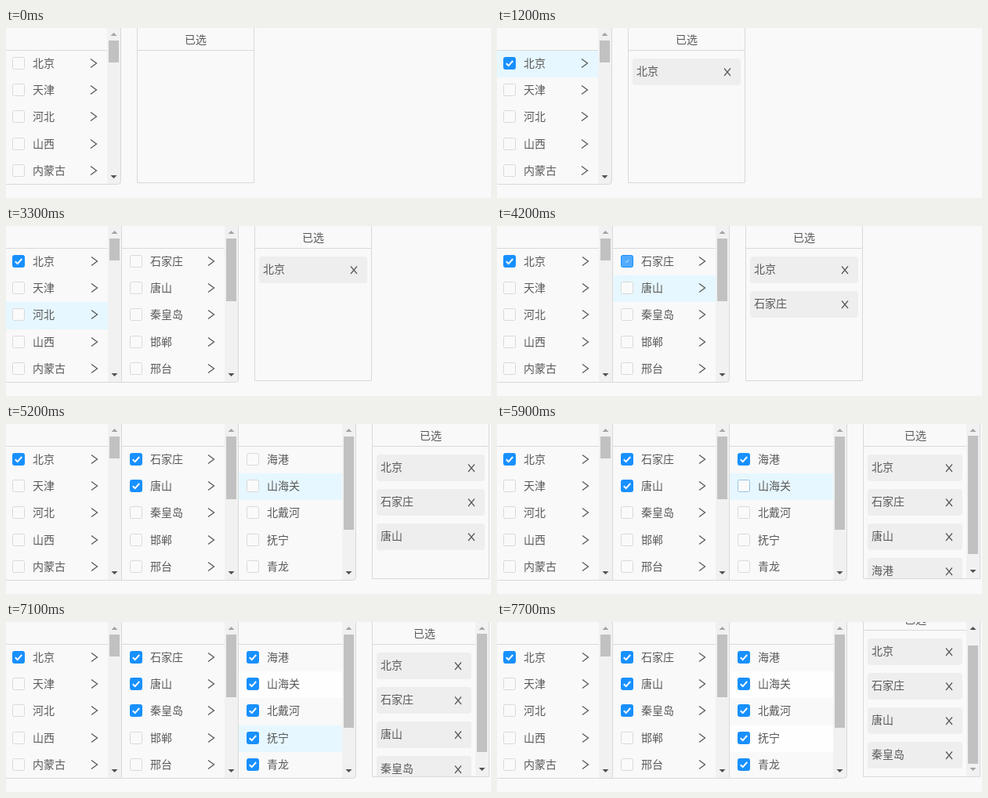
Recreate the animation shown at these times as an HTML page. Size 619 px wide and 217 px high, loop 8000 ms.

```html
<!DOCTYPE html>
<html lang="zh-CN">
<head>
<meta charset="utf-8">
<title>级联多选</title>
<style>
html, body { margin: 0; width: 100%; height: 100%; overflow: hidden; background: #f9f9f9; }
svg { display: block; }
text { font: 14px "Noto Sans CJK SC", "Noto Sans CJK", "Noto Sans SC", sans-serif; fill: #595959; }
</style>
</head>
<body>
<svg id="stage" width="619" height="217" viewBox="0 0 619 217"></svg>
<script>
const LOOP = 8000, STEP = 100;
const LINE = '#d9d9d9', BLUE = [24, 144, 255], PAPER = [250, 250, 250], GREY = [217, 217, 217];
const ROW_TOP = [29, 63, 97, 132, 166, 200];

const provinces = ['北京', '天津', '河北', '山西', '内蒙古'];
const hebei = ['石家庄', '唐山', '秦皇岛', '邯郸', '邢台'];
const beijing = ['东城', '西城', '朝阳', '丰台', '石景山'];
const qinhuangdao = ['海港', '山海关', '北戴河', '抚宁', '青龙'];

// [time, column, row] of the row under the pointer
const hovers = [
  [0], [200, 0, 1], [400, 0, 0], [1700, 1, 0], [2200], [2300, 0, 1], [2900, 0, 2],
  [3400], [3500, 1, 0], [4200, 1, 1], [4800, 1, 2], [5100], [5200, 2, 1], [5400, 2, 0],
  [5800, 2, 1], [6300, 1, 2], [7000, 2, 2], [7100, 2, 3], [7200]
];

// name: [pointer reaches the box, click]
const clicks = {
  北京: [800, 900], 石家庄: [3700, 4100], 唐山: [4300, 4500],
  海港: [5400, 5600], 山海关: [5900, 6000], 秦皇岛: [6400, 6500]
};
for (const name of ['北戴河', '抚宁', '青龙']) clicks[name] = [6500, 6500];
for (const name of beijing) clicks[name] = [0, -1000];

// name: [tag added, tag removed]
const tags = {
  北京: [900, LOOP], 石家庄: [4100, LOOP], 唐山: [4500, LOOP],
  海港: [5600, 6500], 山海关: [6000, 6500], 秦皇岛: [6500, LOOP]
};

const clamp = v => Math.max(0, Math.min(1, v));
const mix = (a, b, p) => `rgb(${a.map((v, i) => Math.round(v + (b[i] - v) * p))})`;
const rect = (x, y, w, h, fill, more = '') =>
  `<rect x="${x}" y="${y}" width="${w}" height="${h}" fill="${fill}" ${more}/>`;
const path = (d, stroke = LINE, width = 1, more = '') =>
  `<path d="${d}" fill="none" stroke="${stroke}" stroke-width="${width}" ${more}/>`;
const label = (x, y, s, more = '') => `<text x="${x}" y="${y}" ${more}>${s}</text>`;

function scrollbar(x, height, thumbY, thumbH, atEnd = false) {
  const dark = '#505050', pale = '#a3a3a3', mid = x + 8.5, low = height - 11;
  return rect(x, 0, 17, height, '#f1f1f1') +
    rect(x + 2, thumbY, 13, thumbH, '#c1c1c1') +
    `<path d="M${mid - 4} 10h8l-4 -4z" fill="${atEnd ? dark : pale}"/>` +
    `<path d="M${mid - 4} ${low}h8l-4 4z" fill="${atEnd ? pale : dark}"/>`;
}

function checkbox(x, y, name, t, hovered) {
  const [enter, click] = clicks[name] || [Infinity, Infinity];
  const age = t - click, on = age >= 0;
  const u = on ? clamp((age + 100) / 400) : 0;
  const p = 1 - (1 - u) ** 2;
  const near = clamp((t - enter + 100) / 300);
  let out = rect(x + .5, y + .5, 15, 15, mix(PAPER, BLUE, p),
    `rx="2" stroke="${mix(GREY, BLUE, Math.max(p, near))}"`);
  if (on) {
    out += path('M-4.2 0.2L-1.3 3.1L4.2 -3', '#fff', 2,
      `opacity="${p}" transform="translate(${x + 8} ${y + 8}) scale(${u})"`);
  }
  if (on && hovered && age < 300) {
    const s = 16 * (1 + .6 * p);
    out += rect(x + 8 - s / 2, y + 8 - s / 2, s, s, 'none',
      `rx="2" stroke="${mix(BLUE, BLUE, 0)}" opacity="${.5 * (1 - u)}"`);
  }
  return out;
}

function column(i, names, thumb, single, t, hover) {
  const left = [0, 148, 297][i];
  const end = thumb ? [130, 279, 429][i] - (single ? 1 : 0) : left + 148;
  const boxX = [8, 158, 307][i], textX = [34, 184, 333][i];
  let out = path(`M${left} 28.5H${end}`);
  names.forEach((name, r) => {
    const top = ROW_TOP[r], h = Math.min(199, ROW_TOP[r + 1]) - top;
    const hovered = hover[1] === i && hover[2] === r;
    const visited = i === 2 && (r === 1 && t >= 6300 || r === 3 && t >= 7200);
    if (hovered || visited) out += rect(left, top, end - left, h, hovered ? '#e6f7ff' : '#fefefe');
    out += checkbox(boxX, top + 8, name, t, hovered) + label(textX, top + 21, name);
    if (i < 2) out += path(`M${end - 21} ${top + 10.5}l7.5 5.5l-7.5 5.5`, '#595959', 1.3);
  });
  if (thumb) out += scrollbar(end, 199, 16, thumb);
  return out;
}

function panel(x, t) {
  const names = Object.keys(tags).filter(n => t >= tags[n][0] && t < tags[n][1]);
  const over = names.length > 3;
  const scroll = 18 * clamp((t - 7400) / 300);
  const inner = over ? 132 : 149;
  const tagW = over ? 121 : 138;
  let out = label(x + (over ? 67 : 75), 20, '已选', 'text-anchor="middle"') +
    path(`M${x} 28.5h${inner}`);
  names.forEach((name, k) => {
    const y = 39 + 44 * k, cx = x + 6 + tagW - 17, cy = y + 17;
    out += rect(x + 6, y, tagW, 34, '#eee', 'rx="4"') + label(x + 11, y + 21, name) +
      path(`M${cx - 4} ${cy - 4.5}l8 9.5m0 -9.5l-8 9.5`, '#595959', 1.2);
  });
  out = `<clipPath id="view"><rect x="${x}" y="0" width="150" height="197"/></clipPath>` +
    `<g clip-path="url(#view)"><g transform="translate(0 ${-scroll})">${out}</g></g>`;
  if (over) {
    out += scrollbar(x + 132, 197, 15 + scroll * 15 / 18, names.length > 4 ? 126 : 151, scroll === 18);
  }
  return out + path(`M${x + .5} 0V197.5H${x + 149.5}V0`);
}

function draw(t) {
  const hover = hovers.filter(h => h[0] <= t).pop();
  const cols = [[provinces, 28]];
  if (t >= 3300) cols.push([hebei, 80]);
  else if (t >= 1400) cols.push([[t < 2700 ? '北京' : '天津'], 0]);
  if (t >= 5000) cols.push([qinhuangdao, 119]);
  else if (t >= 2000 && t < 2700) cols.push([beijing, 56]);

  const n = cols.length, right = 146.5 + 150 * (n - 1);
  let out = cols.map(([names, thumb], i) => column(i, names, thumb, n === 1, t, hover)).join('');
  if (n > 1) out += path('M147.5 0V199');
  if (n > 2) out += path('M296.5 0V199');
  out += path(`M0 199.5H${right - 4}q4 0 4 -4V0`);
  return out + panel(167 + 150 * (n - 1), t);
}

const stage = document.getElementById('stage');
const start = performance.now();
let shown = -1;
function frame() {
  const t = Math.floor((performance.now() - start) % LOOP / STEP) * STEP;
  if (t !== shown) stage.innerHTML = draw(shown = t);
  requestAnimationFrame(frame);
}
frame();
</script>
</body>
</html>
```
